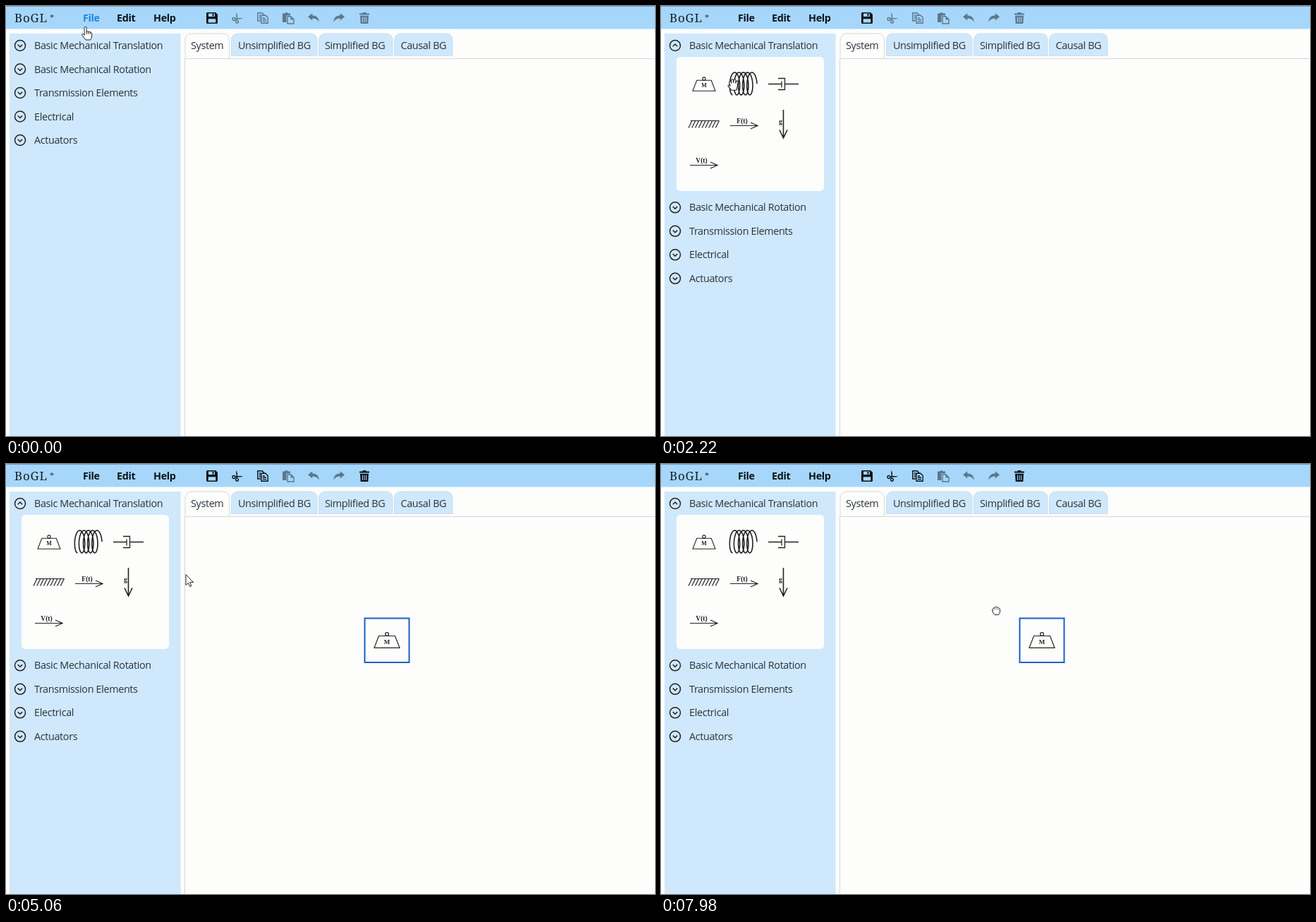
Recreate the animation shown at these times as an HTML page. Size 920 by 609 pixels, loop 8 s.

```html
<!DOCTYPE html>
<html lang="en">
<head>
<meta charset="utf-8">
<title>Diagram editor</title>
<style>
html, body { margin: 0; width: 100%; height: 100%; overflow: hidden; background: #fdfdfc; }
svg { display: block; width: 100%; height: 100%; }
.ui { font: 14.4px "Open Sans", sans-serif; letter-spacing: -.36px; fill: #2a333b; }
.menu { font-weight: 700; fill: #0c141c; }
.logo { font-family: "Noto Serif", serif; fill: #16202a; }
.serif { font-family: "Liberation Serif", serif; fill: #222; }
.line { fill: none; stroke: #222; }
.cursor { fill: #fff; stroke: #222; stroke-width: 1; stroke-linejoin: round; stroke-linecap: round; }
</style>
</head>
<body>
<svg id="stage" viewBox="0 0 920 609"></svg>
<script>
const LOOP = 8000, OPEN = 700, OPEN_TIME = 200, DROP = 4300, ENABLE = 4520;
const $ = id => document.getElementById(id);
const text = (x, y, s, cls = 'ui', extra = '') => `<text x="${x}" y="${y}" class="${cls}" ${extra}>${s}</text>`;
const line = (d, w = 1.2) => `<path class="line" d="${d}" stroke-width="${w}"/>`;
const group = (x, y, body, extra = '') => `<g transform="translate(${x} ${y})" ${extra}>${body}</g>`;
const range = (n, f) => Array.from({ length: n }, (_, i) => f(i)).join('');

// Toolbar glyphs in a 16 px box
const icons = {
  save: `<path fill-rule="evenodd" d="M0 1.5Q0 0 1.5 0H13L16 3V14.5Q16 16 14.5 16H1.5Q0 16 0 14.5zM3 1.5V6H12V1.5zM2.7 9.3V14.5H13.3V9.3z"/><path d="M8.5 2h2v3.4h-2z"/>`,
  cut: `<path d="M6.6 0Q8.2 2 8 8L16 8.2Q14 10 8.4 9.4L6.8 11 5.4 9.4 6.7 7.8Q5.7 3 6.6 0z"/><g fill="none" stroke="#0b1117" stroke-width="1.4"><circle cx="3" cy="9.5" r="2"/><circle cx="7.5" cy="13.3" r="1.9"/></g>`,
  copy: `<g fill="none" stroke="#0b1117" stroke-width="1.4"><path d="M5 12H.8V.8H7L10 3.8M2.8 4H5M2.8 6.5H5M2.8 9H5M6 4.3H12L15.2 7.5V15.2H6zM8 8H11M8 10.3H13M8 12.6H13"/></g>`,
  paste: `<path d="M0 1.5H3Q4 0 5.5 0T8 1.5H11V4.5H5.5V14H0z"/><path d="M7 6H12L16 10V16H7z" fill="none" stroke="#0b1117" stroke-width="1.4"/><path d="M11.5 6V10.5H16z"/>`,
  undo: `<path d="M0 6.3L6.2 1.2V4.3Q15.5 4.5 15.6 13.8 13 8.5 6.2 8.5V11.5z"/>`,
  redo: `<path d="M16 6.3L9.8 1.2V4.3Q.5 4.5 .4 13.8 3 8.5 9.8 8.5V11.5z"/>`,
  trash: `<path fill-rule="evenodd" d="M1 1.6H5L6 0H10L11 1.6H15V3.6H1zM2 4.8H14L13.3 16H2.7zM4.9 6.7V14H6V6.7zM7.5 6.7V14H8.6V6.7zM10.1 6.7V14H11.2V6.7z"/>`
};
const toolbar = Object.keys(icons).map((k, i) =>
  group(284 + 36 * i, 9, icons[k], `id="${k}" fill="#0b1117" opacity="${i ? .48 : 1}"`)).join('');

const tab = (x, w, label, tx, active) =>
  `<path d="M${x} ${active ? 74 : 70.5}V49Q${x} 39 ${x + 10} 39H${x + w - 10}Q${x + w} 39 ${x + w} 49V${active ? 74 : 70.5}${active ? '' : 'z'}"
    fill="${active ? '#fdfdfc' : '#d0e8fb'}" stroke="${active ? '#d5d8da' : '#c9dff0'}"/>` + text(tx, 61, label);

const row = (i, label) => group(0, 56 + 33.5 * i,
  `<circle class="line" cx="20" cy="0" r="7.5" stroke-width="1.5"/>
   <path id="chev${i}" class="line" d="M16.8 -1.2L20 2L23.2 -1.2" stroke-width="1.5"/>` + text(40, 5, label), `id="row${i}"`);

const mass = `<path class="line" d="M-18 10.4L-11.5 -6.5H11.5L18 10.4z" stroke-width="1.2"/>
  <circle class="line" cx="0" cy="-9" r="2.4" stroke-width="1.2"/>` +
  text(0, 5, 'M', 'serif', 'font-size="9" font-weight="700" text-anchor="middle"');
const arrow = (x, y, label, tx) => line(`M${x} ${y}h39M${x + 29} ${y - 4.5}l10 4.5l-10 4.5`) +
  text(tx, y - 3.6, label, 'serif', 'font-size="9.5" font-weight="700" text-anchor="middle"');

// Helix seen from the side, from the bottom of the first turn
const coil = 'M' + Array.from({ length: 121 }, (_, i) => {
  const a = -Math.PI / 2 + i / 120 * 9.5 * Math.PI;
  return `${(103 - 5.6 * Math.cos(a) + 6.1 * a / (2 * Math.PI)).toFixed(2)} ${(110 - 16 * Math.sin(a)).toFixed(2)}`;
}).join('L');

const palette = `<rect x="22" y="72" width="209" height="190" rx="5" fill="#fdfdfc"/>` +
  group(61, 111, `<g transform="scale(.89)">${mass}</g>`) +
  line(coil, 1.6) +
  line('M152 110.5H171M171 106.5V115.5M166 102.5H175.5V118.5H166M175.5 110.5H195', 1.3) +
  line('M42 162.5H82.5' + range(9, i => `M${44 + 4.8 * i} 162.5l-5 10`)) +
  arrow(98, 169.5, 'F(t)', 115) + arrow(41, 225.5, 'V(t)', 57.5) +
  line('M173.5 147V187M168 175.5L173.5 187L179 175.5', 1.6) +
  text(167, 167, 'g', 'serif', 'font-size="10" font-weight="700"');

const cursors = {
  pointer: `<path d="M-2 2a1.6 1.6 0 0 1 3.2 0V7.5q1-1.2 2.6 0q1.6-.8 2.6 .5q2-.3 2.2 1.5V14q0 2.5-2 5H0q-1.5-2.5-5-6.5q-.8-1.6 .5-2.2q1.2-.2 2.5 1.8z"/>
    <path d="M1.2 7.5v3M3.8 7.7v2.8M6.4 8.4v2.1"/>`,
  arrow: `<path d="M0 0V14.5L3.4 11.4L5.6 16.6L7.9 15.6L5.7 10.6H10.2z"/>`,
  grab: `<path transform="scale(1.1)" d="M-3.5 2L-4.6-3a1.3 1.3 0 0 1 2.5-.6l.4 1.6L-2-5.6a1.3 1.3 0 0 1 2.6-.2L.9-2.5L1.2-5.8a1.3 1.3 0 0 1 2.6 .1L3.7-2L4.5-4.3a1.2 1.2 0 0 1 2.3 .6L5.8 2Q5.6 4.5 4.5 7H-1.8Q-3 5-6 2.2a1.2 1.2 0 0 1 1.6-1.6z"/>`,
  fist: `<path d="M-5.3-.6q-.2-2.4 1.6-2.8q.5-2 2.6-1.8q1.2-.9 2.5 0q2-.3 2.4 1.3q1.8 .2 1.7 2.1v2.5q-.2 3-2 4.8h-5.6q-2.6-2-3.2-6z"/>
    <path d="M-2.7-3.2v1.2M0-3.6v1.4M2.7-3v1.2" stroke-width=".8"/>`
};

$('stage').innerHTML = `
  <rect width="920" height="609" fill="#fdfdfc"/>
  <rect width="920" height="32.5" fill="#a6d7fa"/><rect width="920" height="1" fill="#6f9fcb"/>
  ${text(12, 23, 'BoGL', 'logo', 'font-size="17" letter-spacing=".8"')}
  ${text(62, 20, '*', 'serif', 'font-size="12"')}
  ${text(109, 22, 'File', 'ui menu', 'id="file"')}${text(157, 22, 'Edit', 'ui menu')}${text(209, 22, 'Help', 'ui menu')}
  ${toolbar}
  <rect x="5" y="39" width="242.5" height="570" fill="#d0e8fc"/>
  <path d="M253.5 609V74.5H920" fill="none" stroke="#d5d8da"/>
  ${tab(254, 62.5, 'System', 262, true)}${tab(319.5, 121.5, 'Unsimplified BG', 329)}
  ${tab(443.5, 104.5, 'Simplified BG', 452)}${tab(550.5, 82.5, 'Causal BG', 559.5)}
  <clipPath id="fold"><rect id="foldBox" x="22" y="72" width="209" height="190" rx="5"/></clipPath>
  <g id="palette" clip-path="url(#fold)">${palette}</g>
  ${['Basic Mechanical Translation', 'Basic Mechanical Rotation', 'Transmission Elements', 'Electrical', 'Actuators'].map((s, i) => row(i, s)).join('')}
  ${group(540, 250, `<rect x="-31.5" y="-31.5" width="63" height="62.5" fill="#fdfdfc" stroke="#1b5fc9" stroke-width="2"/>` + mass, 'id="placed"')}
  <g id="cursor" class="cursor">${Object.keys(cursors).map(k => `<g id="c-${k}">${cursors[k]}</g>`).join('')}</g>`;

// Pointer hot spot: time, x, y
const path = [
  [0, 113, 29], [450, 103, 52], [800, 100, 54], [1280, 99, 54], [1550, 95, 62], [1950, 64, 110],
  [2350, 114, 112], [2800, 170, 114], [3200, 184, 149], [3520, 64, 112], [3640, 61, 111],
  [4250, 540, 250], [4620, 540, 250], [5060, 255, 157], [5450, 150, 126], [6040, 97, 115],
  [6450, 117, 111], [6700, 117, 111], [7700, 465, 206], [7980, 475, 208], [8000, 475, 208]
];
const shapes = [[0, 'pointer'], [1620, 'arrow'], [1820, 'grab'], [3600, 'fist'], [DROP, 'pointer'],
  [4680, 'arrow'], [5300, 'grab'], [6620, 'fist']];
const ease = p => p * p * (3 - 2 * p);
const clamp = p => Math.max(0, Math.min(1, p));
const show = (el, on) => el.setAttribute('display', on ? 'inline' : 'none');

function position(t) {
  const i = Math.max(1, path.findIndex(k => k[0] > t));
  const [t0, x0, y0] = path[i - 1], [t1, x1, y1] = path[i];
  const p = ease((t - t0) / (t1 - t0));
  return [x0 + (x1 - x0) * p, y0 + (y1 - y0) * p];
}

function render(t) {
  const unfold = ease(clamp((t - OPEN) / OPEN_TIME));
  show($('palette'), unfold > 0);
  $('foldBox').setAttribute('height', 190 * unfold);
  for (let i = 1; i < 5; i++)
    $('row' + i).setAttribute('transform', `translate(0 ${56 + 33.5 * i + 195.8 * unfold})`);
  $('chev0').setAttribute('transform', t >= OPEN ? 'scale(1 -1)' : '');
  $('file').style.fill = t < 180 ? '#1b86e8' : '';
  show($('placed'), t >= DROP);
  for (const id of ['cut', 'copy', 'trash']) $(id).setAttribute('opacity', t >= ENABLE ? 1 : .48);

  const [x, y] = position(t);
  const shape = shapes.filter(s => s[0] <= t).pop()[1];
  $('cursor').setAttribute('transform', `translate(${x.toFixed(1)} ${y.toFixed(1)})`);
  for (const k in cursors) show($('c-' + k), k === shape);
}

const start = performance.now();
function tick() {
  render((performance.now() - start) % LOOP);
  requestAnimationFrame(tick);
}
tick();
</script>
</body>
</html>
```
